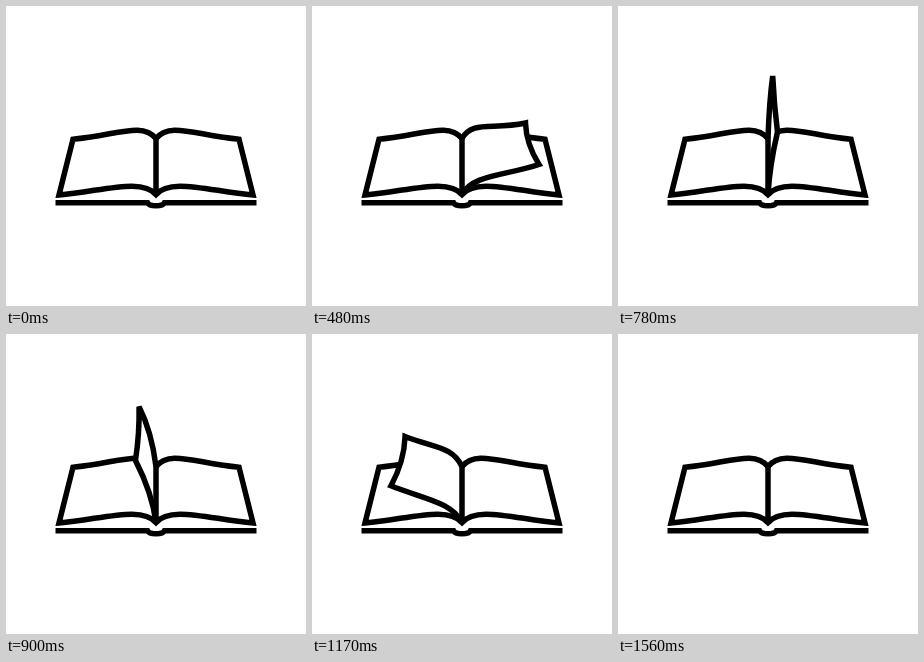
Animation of 300 by 300 pixels, one loop 1.68 s. Source, as an HTML page with a canvas:

```html
<!DOCTYPE html>
<html lang="en">
<head>
<meta charset="utf-8">
<title>Turning page</title>
<style>
html, body { margin: 0; width: 100%; height: 100%; overflow: hidden; background: #fff; }
canvas { display: block; }
</style>
</head>
<body>
<canvas id="stage" width="300" height="300"></canvas>
<script>
const ctx = document.getElementById('stage').getContext('2d');
const LOOP = 1680, STEP = 30, START = 150, END = 1560;
const CENTER = 150;

// Upper and lower page edges: height at the spine, reach and height of the outer corner at rest
const TOP = { spineY: 132.5, reach: 83, restY: 133.2 };
const BOTTOM = { spineY: 188.5, reach: 97, restY: 189 };

// A page lying flat; side is 1 for right, -1 for left
const flatPage = side => [
  CENTER + side * TOP.reach, TOP.restY,
  CENTER + side * BOTTOM.reach, BOTTOM.restY
];

// Outer corners of the turning page: upper x, y, lower x, y
const PATH = [
  { time: START, page: flatPage(1) },
  { time: 330, page: [231.5, 131.5, 244.5, 175] },
  { time: 480, page: [213.5, 117, 227, 158.5] },
  { time: 780, page: [154.7, 70, 159.5, 126] },
  { time: 1020, page: [113.5, 83, 102, 133] },
  { time: 1350, page: [75.5, 125.5, 62, 176.5] },
  { time: END, page: flatPage(-1) }
];

// Velocity of coordinate k at key i, at rest on both ends
function velocity(i, k) {
  const a = PATH[i - 1], b = PATH[i], c = PATH[i + 1];
  if (!a || !c) return 0;
  const before = b.time - a.time, after = c.time - b.time;
  const arriving = (b.page[k] - a.page[k]) / before;
  const leaving = (c.page[k] - b.page[k]) / after;
  return (arriving * after + leaving * before) / (before + after);
}

function pageAt(time) {
  const next = PATH.findIndex(key => key.time > time);
  const a = PATH[next - 1], b = PATH[next];
  const span = b.time - a.time, u = (time - a.time) / span;
  const blend = u * u * (3 - 2 * u);
  return a.page.map((value, k) =>
    value + (b.page[k] - value) * blend +
    span * u * (1 - u) * ((1 - u) * velocity(next - 1, k) - u * velocity(next, k)));
}

// Paper curve from the spine to a corner; it arches up at rest and sags as the corner lifts
function paperCurve(edge, x, y) {
  const side = (x - CENTER) / edge.reach;
  const lift = Math.max(0, edge.restY - y);
  return {
    side, lift,
    inner: [CENTER + 14 * side, edge.spineY - 17 - 0.1 * lift],
    outer: [x - 44 * side, y - 4 + 2.8 * Math.sqrt(lift)]
  };
}

// Page outline from the top of the spine around to its bottom
function tracePage([topX, topY, bottomX, bottomY]) {
  const top = paperCurve(TOP, topX, topY);
  const bottom = paperCurve(BOTTOM, bottomX, bottomY);
  const bend = -1.4 * bottom.side * Math.sqrt(bottom.lift);
  ctx.moveTo(CENTER, TOP.spineY);
  ctx.bezierCurveTo(...top.inner, ...top.outer, topX, topY);
  ctx.quadraticCurveTo((topX + bottomX) / 2 + bend, (topY + bottomY) / 2, bottomX, bottomY);
  ctx.bezierCurveTo(...bottom.outer, ...bottom.inner, CENTER, BOTTOM.spineY);
}

function drawPage(page) {
  ctx.beginPath();
  tracePage(page);
  ctx.fill();
  ctx.stroke();
}

function drawSpine() {
  ctx.beginPath();
  ctx.moveTo(CENTER, TOP.spineY - 1);
  ctx.lineTo(CENTER, BOTTOM.spineY);
  ctx.stroke();
  // pointed foot where both pages meet
  ctx.beginPath();
  ctx.moveTo(CENTER - 3, BOTTOM.spineY - 3);
  ctx.lineTo(CENTER, BOTTOM.spineY);
  ctx.lineTo(CENTER + 3, BOTTOM.spineY - 3);
  ctx.stroke();
}

function drawCover() {
  const y = 196.75;
  ctx.beginPath();
  ctx.moveTo(49.5, y);
  ctx.lineTo(141.5, y);
  ctx.quadraticCurveTo(143, y + 3, CENTER, y + 3);
  ctx.quadraticCurveTo(157, y + 3, 158.5, y);
  ctx.lineTo(250.5, y);
  ctx.stroke();
}

function draw(time) {
  ctx.fillStyle = '#fff';
  ctx.fillRect(0, 0, 300, 300);
  ctx.strokeStyle = '#000';
  ctx.lineWidth = 5.5;
  ctx.miterLimit = 4;
  drawCover();
  drawPage(flatPage(-1));
  drawPage(flatPage(1));
  if (time > START && time < END) drawPage(pageAt(time));
  drawSpine();
}

const origin = performance.now();
function tick() {
  const time = (performance.now() - origin) % LOOP;
  draw(Math.floor(time / STEP) * STEP);
  requestAnimationFrame(tick);
}
tick();
</script>
</body>
</html>
```
